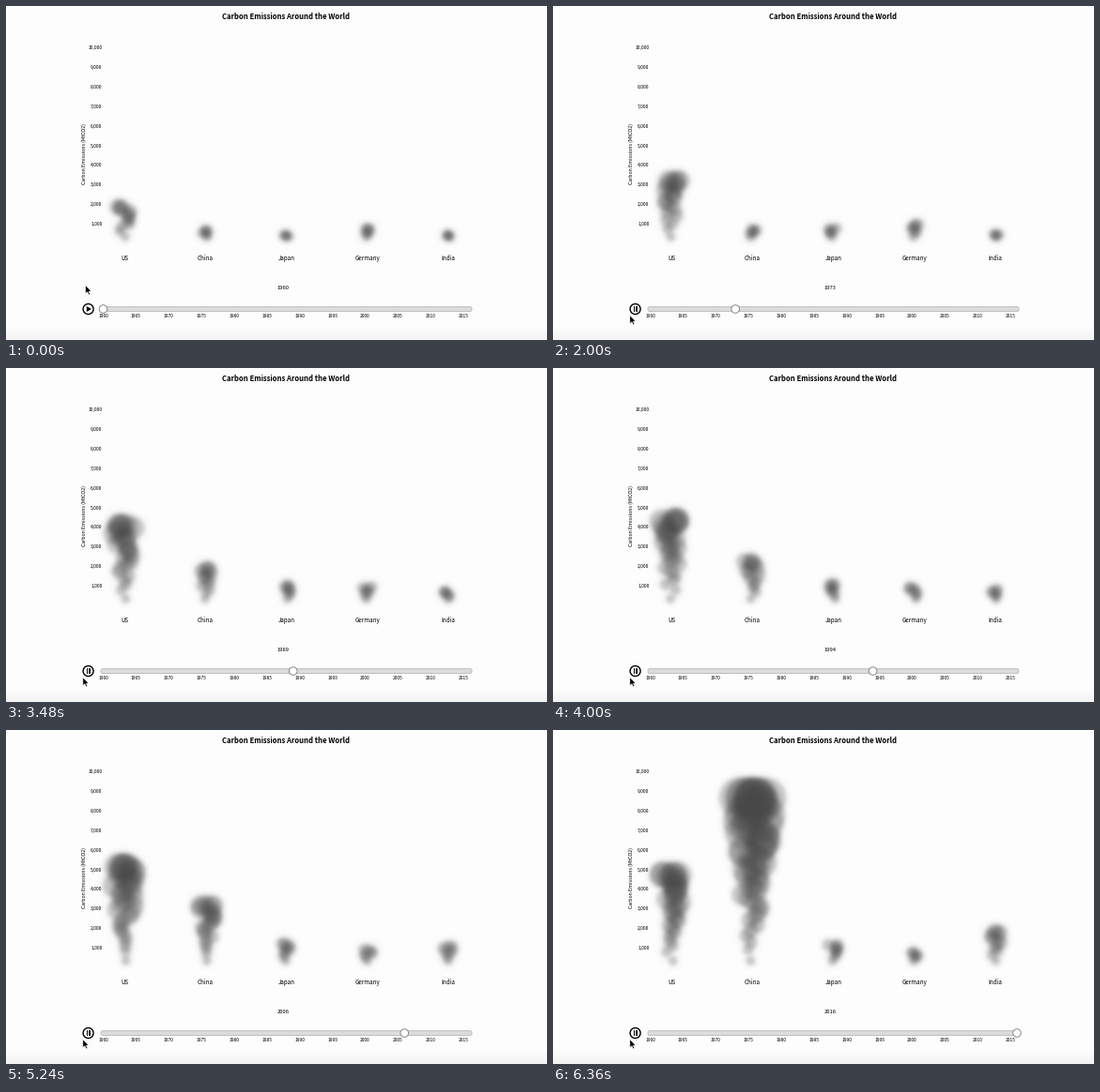
These frames come from a looping animation (576x356 px, 6.4 s). A matplotlib script:

```python
import numpy as np
import matplotlib.pyplot as plt
from matplotlib.animation import FuncAnimation
from matplotlib.patches import Circle, FancyBboxPatch, Polygon, Rectangle

W, H, DPI = 576, 356, 100
STEP, FRAMES = 40, 160
SMOKE = 70 / 255
FONT = "Noto Sans CJK JP"
BASE = 246

# Playback pace: time in ms against year
TIMES = [560, 2000, 3480, 4480, 5240, 5720, 6190]
YEARS = [1960, 1973.1, 1989.1, 1999.1, 2006.2, 2012.1, 2016.001]

# Height of each smoke column in pixels at the key years
KEY_YEARS = [1960, 1973, 1999, 2006, 2016]
COLUMNS = {
    "US": [32, 60, 89, 100, 92],
    "China": [7, 8, 47, 57, 174],
    "Japan": [2, 9, 17, 18, 17],
    "Germany": [9, 13, 12, 12, 9],
    "India": [2, 3, 11, 15, 31],
}

MAX_PUFFS = 60
rng = np.random.default_rng(11)
phases = rng.random((len(COLUMNS), MAX_PUFFS))
speeds = rng.uniform(-0.12, 0.12, (len(COLUMNS), MAX_PUFFS))


def column_x(k):
    return 126 + 86.3 * k


def slider_x(year):
    return 103.5 + 6.973 * (year - 1960)


def triangle(x):
    """Triangle wave of period 1 between -1 and 1."""
    return 4 * np.abs(x % 1 - 0.5) - 1


def puff(clear, x, y, r, alpha):
    """Multiply one soft disc into the transmittance map."""
    m = r + 8
    x0, x1 = int(x - m), int(x + m) + 1
    y0, y1 = int(y - m), int(y + m) + 1
    yy, xx = np.mgrid[y0:y1, x0:x1] + 0.5
    d = np.hypot(xx - x, yy - y)
    clear[y0:y1, x0:x1] *= 1 - alpha / (1 + np.exp((d - r) / 1.6))


def smoke_alpha(year):
    """More emissions give more puffs; they widen and crowd with height."""
    clear = np.ones((H, W))
    for k, heights in enumerate(COLUMNS.values()):
        height = np.interp(year, KEY_YEARS, heights)
        count = 4 + 0.27 * height
        i = np.arange(int(np.ceil(count)))
        rise = height * np.minimum(1, 1.1 * (i / (count - 1)) ** 0.7)
        sway = triangle(phases[k, i] + speeds[k, i] * (year - 1960))
        xs = column_x(k) + sway * (2 + 1.1 * np.sqrt(rise))
        radii = 4.5 + 0.095 * rise
        alphas = 0.3 * np.minimum(1, count - i)
        for x, y, r, a in zip(xs, BASE - rise, radii, alphas):
            puff(clear, x, y, r, a)
    return 1 - clear


def label(x, y, text, px, **kw):
    kw = {"ha": "center", "va": "center_baseline", "color": "black",
          "weight": 500, **kw}
    return ax.text(x, y, text, fontsize=px * 72 / DPI, family=FONT, **kw)


fig = plt.figure(figsize=(W / DPI, H / DPI), dpi=DPI, facecolor="#fefdfe")
ax = fig.add_axes([0, 0, 1, 1])
ax.axis("off")

shade = np.linspace(253, 243, 16)[:, None] / 255
ax.imshow(shade, extent=(0, W, H, 340), cmap="gray", vmin=0, vmax=1,
          aspect="auto", zorder=0)
image = np.full((H, W, 4), SMOKE)
image[..., 3] = 0
smoke = ax.imshow(image, extent=(0, W, H, 0), interpolation="nearest",
                  aspect="auto", zorder=3)
ax.set(xlim=(0, W), ylim=(H, 0))

label(298.5, 11, "Carbon Emissions Around the World", 7.7, weight="bold")
label(83.5, 157, "Carbon Emissions (MtCO2)", 5.3, rotation=90, va="center")
for n in range(1, 11):
    label(102.5, 253 - 20.9 * n, f"{n * 1000:,}", 5, ha="right")
for k, name in enumerate(COLUMNS):
    label(column_x(k), 268, name, 6.2)
for y in range(1960, 2016, 5):
    label(slider_x(y), 329.5, str(y), 4.8)
year_text = label(295, 300, "1960", 5.8)

ax.add_patch(FancyBboxPatch((103.2, 322.8), 390.6, 0.6,
                            boxstyle="round,pad=2.2,rounding_size=2.2",
                            fc="#dcdcdc", ec="#b8b8b8", lw=0.6))
knob = ax.add_patch(Circle((103.5, 323), 4.3, fc="white", ec="#888888",
                           lw=0.7, zorder=4))

ax.add_patch(Circle((87.6, 323), 5.5, fc="white", ec="black", lw=1))
play = ax.add_patch(Polygon([(85.8, 320), (85.8, 326), (91, 323)],
                            color="black", lw=0))
bars = [ax.add_patch(Rectangle((x, 320.4), 1.4, 5.2, color="black", lw=0))
        for x in (85.6, 88.2)]

ARROW = np.array([(0, 0), (0, 9.2), (2.1, 7.3), (3.7, 10.6), (5.2, 9.9),
                  (3.7, 6.7), (6.4, 6.5)])
cursor = ax.add_patch(Polygon(ARROW, fc="black", ec="white", lw=0.5, zorder=6))


def draw(i):
    t = i * STEP
    year = np.interp(t, TIMES, YEARS)
    year_text.set_text(str(int(year)))
    knob.center = slider_x(int(year)), 323

    playing = t >= 520
    play.set_visible(not playing)
    for bar in bars:
        bar.set_visible(playing)

    path = [0, 360, 600, 920]
    tip = (np.interp(t, path, [84.5, 86.5, 86, 81.8]),
           np.interp(t, path, [297.5, 326, 327, 329.5]))
    cursor.set_xy(ARROW + tip)

    image[..., 3] = smoke_alpha(year)
    smoke.set_data(image)
    return smoke, year_text, knob, play, cursor, *bars


anim = FuncAnimation(fig, draw, frames=FRAMES, interval=STEP,
                     init_func=lambda: draw(0), repeat=True, repeat_delay=0)
plt.show()
```
